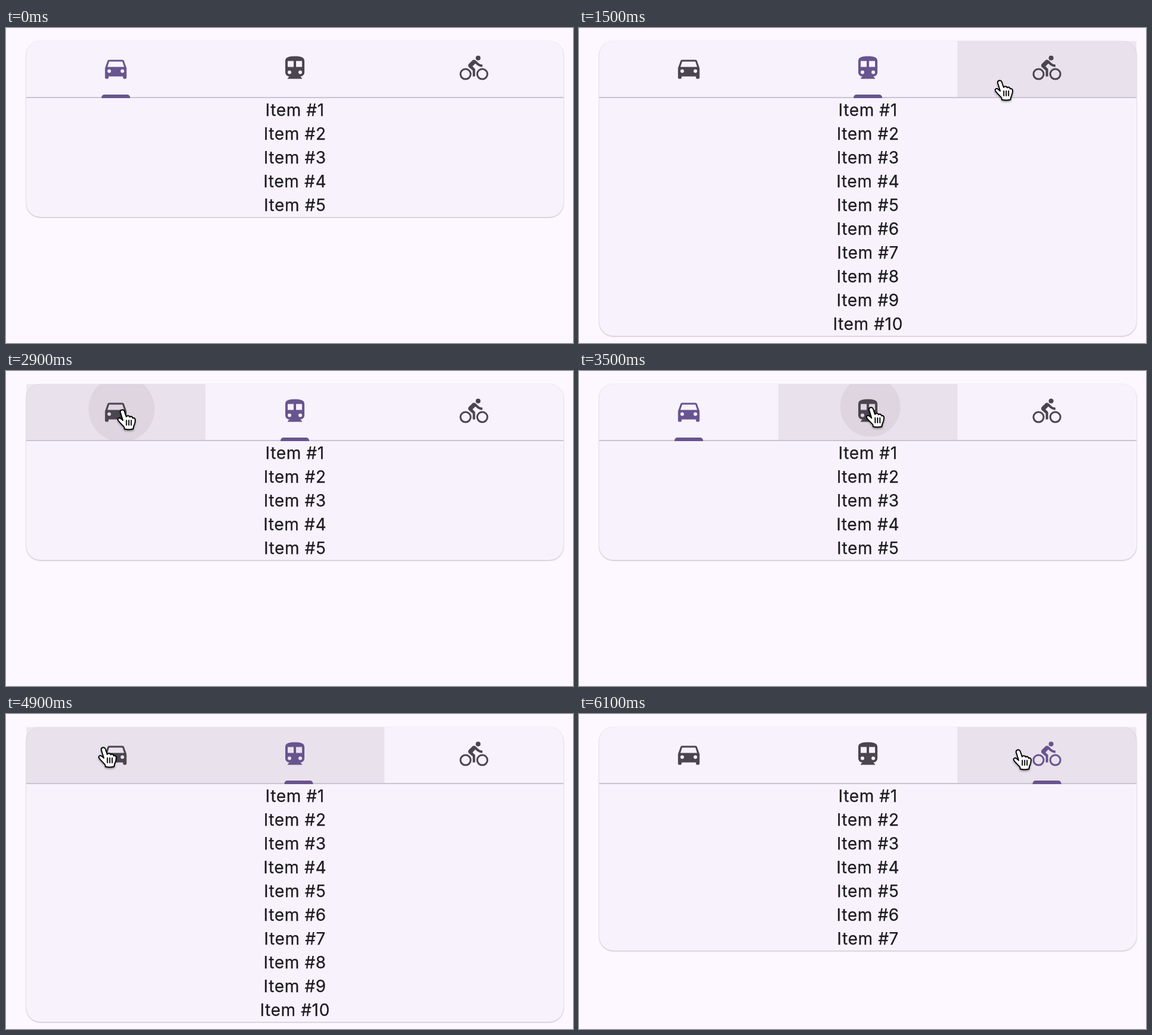
An HTML page that plays this animation: 952x530 px, repeating every 7000 ms.

```html
<!DOCTYPE html>
<html lang="en">
<head>
<meta charset="utf-8">
<title>Tabs in a card</title>
<style>
html, body { margin: 0; width: 100%; height: 100%; overflow: hidden; background: #fdf8ff; }
svg { display: block; width: 952px; height: 530px; }
text { font: 400 28px Inter, Roboto, sans-serif; letter-spacing: .65px; text-anchor: middle; fill: #1d1b20; stroke: #1d1b20; stroke-width: .25; }
#card { fill: #f7f2fc; filter: drop-shadow(0 1.6px 1.1px rgba(0,0,0,.24)) drop-shadow(0 0 1px rgba(0,0,0,.06)); }
#hand { filter: drop-shadow(0 2px 1.5px rgba(0,0,0,.35)); }
</style>
</head>
<body>
<svg viewBox="0 0 952 530">
  <defs>
    <path id="icon0" d="M18.92 6.01C18.72 5.42 18.16 5 17.5 5h-11c-.66 0-1.21.42-1.42 1.01L3 12v8c0 .55.45 1 1 1h1c.55 0 1-.45 1-1v-1h12v1c0 .55.45 1 1 1h1c.55 0 1-.45 1-1v-8zM6.5 16a1.5 1.5 0 0 1 0-3a1.5 1.5 0 0 1 0 3zm11 0a1.5 1.5 0 0 1 0-3a1.5 1.5 0 0 1 0 3zM5 11l1.5-4.5h11L19 11z" fill-rule="evenodd"/>
    <path id="icon1" d="M12 2c-4.42 0-8 .5-8 4v9.5C4 17.43 5.57 19 7.5 19L6 20.5v.5h12v-.5L16.5 19c1.93 0 3.5-1.57 3.5-3.5V6c0-3.5-3.58-4-8-4zM7.5 17a1.5 1.5 0 0 1 0-3a1.5 1.5 0 0 1 0 3zM11 11H6V6h5zm5.5 6a1.5 1.5 0 0 1 0-3a1.5 1.5 0 0 1 0 3zM18 11h-5V6h5z" fill-rule="evenodd"/>
    <g id="icon2">
      <circle cx="15.5" cy="3.5" r="2"/>
      <g fill="none" stroke="currentColor" stroke-width="1.5"><circle cx="5" cy="17" r="4.25"/><circle cx="19" cy="17" r="4.25"/></g>
      <path d="M10.8 10.5l2.4-2.4.8.8c1.3 1.3 3 2.1 5.1 2.1V9c-1.5 0-2.7-.6-3.6-1.5l-1.9-1.9c-.5-.4-1-.6-1.6-.6s-1.1.2-1.4.6L7.8 8.4c-.4.4-.6.9-.6 1.4 0 .6.2 1.1.6 1.4L11 14v5h2v-6.2z"/>
    </g>
  </defs>
  <rect id="card" x="34" y="22" width="902" rx="24"/>
  <g id="washes" fill="#381432"></g>
  <g id="splashes" fill="#381432"></g>
  <rect x="34" y="116" width="902" height="2" fill="#cac4d0"/>
  <g id="icons"></g>
  <path id="bar" d="M-24 118v-1a5 5 0 0 1 5-5h38a5 5 0 0 1 5 5v1z" fill="#68548e"/>
  <g id="list"></g>
  <g id="hand" stroke="#000" stroke-width="1.9" stroke-linecap="round" stroke-linejoin="round">
    <path fill="#fff" d="M-4 3.5C-5 -.5 1 -2.5 2.7 1.5L6 11C7 8.5 11 8.5 12 11.5C13.5 9.8 16.5 10.5 17 13.5C19 12.3 21.5 14 21 17.5C20.8 22 19.5 24.5 18.2 27.5L17.5 31.5C13 32.7 7 32.7 2.8 31.5L2.5 28.5C0 25.5 -4.5 21.5 -7.5 17.5C-10 13.8 -6 11.7 -3.2 14L.2 17Z"/>
    <path fill="none" d="M6.3 17v8M10.3 17v8M14.3 17v8"/>
  </g>
</svg>
<script>
const LOOP = 7000, STEP = 100, LEFT = 34, TOP = 22, TAB = 902 / 3;
const DARK = [74, 69, 78], PRIMARY = [104, 84, 142];
const ITEMS = [5, 10, 7];          // rows under each tab
const SLIDE = 300, PRESS = 150, FADE = 400;

// the pointer leaves at, arrives at, x, y
const ENTER = [770, 268];
const moves = [
  [100, 500, 490, 70], [1000, 1500, 707, 89], [1900, 2200, 520, 89],
  [2500, 2800, 196, 66], [3000, 3400, 491, 62], [3700, 4000, 734, 62],
  [4200, 4400, 456, 58], [4700, 4900, 164, 57], [5300, 5600, 738, 61]
];
// time and tab of each click
const clicks = [[0, 0], [800, 1], [1800, 2], [2300, 1], [2900, 0],
  [3600, 1], [4100, 2], [4700, 1], [5200, 0], [5700, 2]];

const $ = id => document.getElementById(id);
const clamp = v => Math.min(1, Math.max(0, v));
const mix = (a, b, p) => a.map((v, i) => v + (b[i] - v) * p);
const smooth = p => p * p * (3 - 2 * p);
const easeOut = p => 1 - (1 - p) ** 3.5;
const center = tab => LEFT + (tab + .5) * TAB;

function set(el, attrs) {
  for (const k in attrs) el.setAttribute(k, attrs[k]);
  return el;
}
function add(parent, tag, attrs) {
  return parent.appendChild(set(document.createElementNS("http://www.w3.org/2000/svg", tag), attrs));
}

function pointer(t) {
  return moves.reduce((from, [leave, arrive, ...to]) =>
    mix(from, to, smooth(clamp((t - leave) / (arrive - leave)))), ENTER);
}

function isOver(tab, t) {
  const [x, y] = pointer(t);
  return y < TOP + 96 && Math.floor((x - LEFT) / TAB) === tab ? 1 : 0;
}

// hover comes a little late and lingers at half strength
const hover = (tab, t) => .075 * Math.max(isOver(tab, t - 50), isOver(tab, t - 150) / 2);

function selection(t) {
  const i = clicks.filter(c => c[0] <= t).length - 1;
  const [time, tab] = clicks[i], from = i ? clicks[i - 1][1] : tab;
  return { tab, pos: from + (tab - from) * easeOut(clamp((t - time) / SLIDE)) };
}

// a splash swells slowly while pressed, then spreads and fades
function splash(t, click) {
  const age = t - click + PRESS, freed = Math.max(0, t - click);
  return {
    r: Math.max(0, 48 + age * .05 + freed * .7),
    "fill-opacity": age < 0 ? 0 : .06 * clamp(1 - freed / FADE)
  };
}

const washes = [], icons = [], rows = [];
for (let i = 0; i < 3; i++) {
  const box = { x: LEFT + i * TAB, y: TOP, width: TAB, height: 95 };
  const clip = add(document.querySelector("defs"), "clipPath", { id: "tab" + i });
  add(clip, "rect", box);
  washes.push(add($("washes"), "rect", box));
  icons.push(add($("icons"), "use", {
    href: "#icon" + i,
    transform: `translate(${center(i)} 67.5) scale(2.01) translate(-12 -12)`
  }));
}
const rings = clicks.slice(1).map(([time, tab]) => {
  const [x, y] = pointer(time);
  return add($("splashes"), "circle", { cx: x - 2, cy: y - 2, "clip-path": `url(#tab${tab})` });
});
for (let n = 1; n <= 10; n++) {
  const row = add($("list"), "text", { x: 485.2, y: 108 + n * 40 });
  row.textContent = "Item #" + n;
  rows.push(row);
}

function draw(t) {
  const { tab, pos } = selection(t), count = ITEMS[tab];
  set($("card"), { height: 96 + count * 40 });
  rows.forEach((row, i) => set(row, { display: i < count ? "inline" : "none" }));
  set($("bar"), { transform: `translate(${center(pos)} 0)` });

  icons.forEach((icon, i) => {
    const near = clamp(1 - Math.abs(pos - i));
    const color = `rgb(${mix(DARK, PRIMARY, near).map(Math.round)})`;
    set(icon, { fill: color, color });
    set(washes[i], { "fill-opacity": hover(i, t) });
  });
  rings.forEach((ring, i) => set(ring, splash(t, clicks[i + 1][0])));

  set($("hand"), {
    transform: `translate(${pointer(t)})`,
    display: t < moves[0][0] ? "none" : "inline"
  });
}

const start = performance.now();
function tick() {
  const t = (performance.now() - start) % LOOP;
  draw(Math.floor(t / STEP) * STEP);
  requestAnimationFrame(tick);
}
draw(0);
requestAnimationFrame(tick);
</script>
</body>
</html>
```
